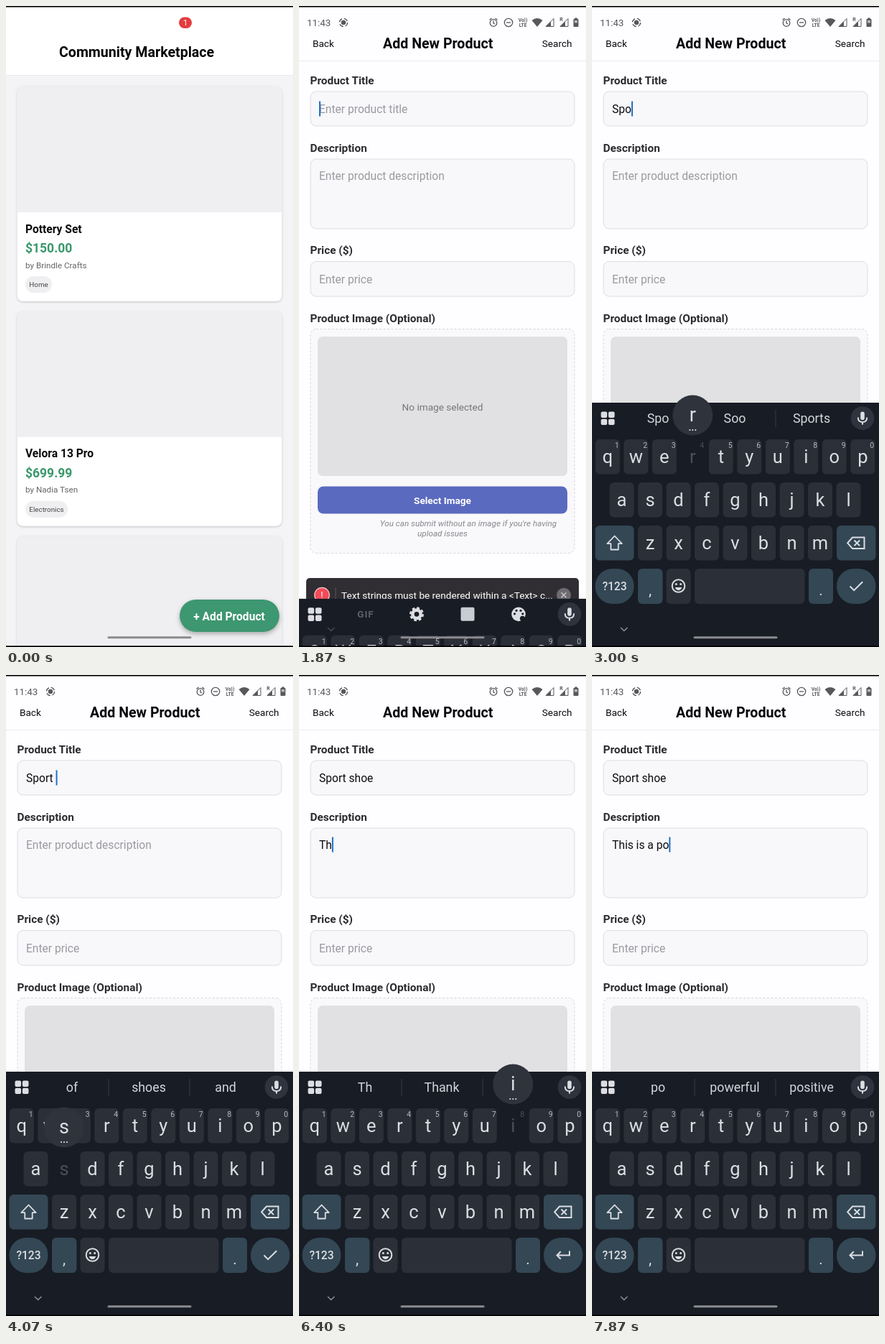
An HTML page that plays this animation: 400 by 892 pixels, repeating every 8000 ms.

```html
<!DOCTYPE html>
<html lang="en">
<head>
<meta charset="utf-8">
<title>Marketplace form</title>
<style>
  html, body { margin: 0; width: 100%; height: 100%; overflow: hidden; background: #fff; }
  svg { display: block; width: 400px; height: 892px; }
  text { font-family: Roboto, sans-serif; white-space: pre; }
  .card { filter: drop-shadow(0 1.5px 1.5px rgba(0, 0, 0, .2)); }
  .fab { filter: drop-shadow(0 3px 3px rgba(0, 0, 0, .28)); }
  .line { fill: none; stroke: #dcdee3; stroke-width: 2; }
</style>
</head>
<body>
<svg id="stage" viewBox="0 0 400 892" xmlns="http://www.w3.org/2000/svg"></svg>
<script>
const LOOP = 8000, COMMIT = 85, FOCUS = [1630, 5170];
const KEY = '#2b2f38', ALT = '#334754', BOARD = '#181c25', INK = '#dcdee3';

// Key presses: time, character, field
const presses = [
  [2560, 'S', 0], [2730, 'p', 0], [2865, 'o', 0], [2985, 'r', 0], [3200, 't', 0], [3500, ' ', 0],
  [4055, 's', 0], [4200, 'h', 0], [4340, 'o', 0], [4490, 'e', 0],
  [6060, 'T', 1], [6220, 'h', 1], [6390, 'i', 1], [6540, 's', 1], [6680, ' ', 1],
  [6860, 'i', 1], [6960, 's', 1], [7060, ' ', 1], [7260, 'a', 1], [7360, ' ', 1],
  [7660, 'p', 1], [7760, 'o', 1]
];

const hints = {
  'S': 'S|So|She', 'Sp': 'Sp|So|Special', 'Spo': 'Spo|Soo|Sports', 'Spor': 'Spor|Sport|Sports',
  'Sport': 'Sport|Sports|Sporting', 'Sport ': 'of|shoes|and', 'Sport s': 's|shoes|shirt',
  'Sport sh': 'sh|shoes|she', 'Sport sho': 'sho|shoes|show', 'Sport shoe': 'shoe|shoes|show',
  'T': 'T|The|This', 'Th': 'Th|Thank|The', 'Thi': 'Thi|This|Think', 'This': 'This|Thus|Things',
  'This ': 'is|was|will', 'This i': 'i|is|in', 'This is': 'is|its|isn\'t', 'This is ': 'a|the|my',
  'This is a': 'a|an|and', 'This is a ': 'great|good|very', 'This is a p': 'p|place|perfect',
  'This is a po': 'po|powerful|positive'
};

// Markup helpers; text is placed by the middle of its capitals
const text = (x, y, s, size, fill, o = '') =>
  `<text x="${x}" y="${(y + size * .355).toFixed(2)}" font-size="${size}" fill="${fill}" ${o}>${s}</text>`;
const rect = (x, y, w, h, r, fill, o = '') =>
  `<rect x="${x}" y="${y}" width="${w}" height="${h}" rx="${r}" fill="${fill}" ${o}/>`;
const circle = (x, y, r, fill, o = '') => `<circle cx="${x}" cy="${y}" r="${r}" fill="${fill}" ${o}/>`;
const path = (d, o = '') => `<path d="${d}" ${o}/>`;
const group = (id, body, o = '') => `<g id="${id}" ${o}>${body}</g>`;
const BOLD = 'font-weight="700"', MID = 'text-anchor="middle"';

const card = (y, title, price, seller, tag, tagWidth) => `
  ${rect(15.5, y, 369, 299, 8, '#fff', 'class="card"')}
  ${path(`M15.5 ${y + 175}v-167q0-8 8-8h353q8 0 8 8v167z`, 'fill="#efeef1"')}
  ${text(27, y + 198, title, 15.6, '#0c0c0e', BOLD)}
  ${text(27, y + 225, price, 17.5, '#3a986c', BOLD)}
  ${text(27, y + 248.5, seller, 11.7, '#66666a')}
  ${rect(27, y + 264, tagWidth, 23, 11.5, '#efeef1')}
  ${text(27 + tagWidth / 2, y + 275.8, tag, 9.8, '#47474b', MID)}`;

const market = `
  ${rect(0, 0, 400, 892, 0, '#f4f3f6')}
  ${rect(0, 0, 400, 96, 0, '#fff')}${rect(0, 96, 400, 1, 0, '#e9e8eb')}
  ${rect(241, 15.5, 18, 15.5, 7.7, '#e53c3f')}${text(250, 23.2, '1', 11.7, '#fff', MID)}
  ${text(74, 64, 'Community Marketplace', 19.6, '#050507', BOLD)}
  ${card(112, 'Pottery Set', '$150.00', 'by Brindle Crafts', 'Home', 37)}
  ${card(424.7, 'Velora 13 Pro', '$699.99', 'by Nadia Tsen', 'Electronics', 59)}
  ${card(738, '', '', '', '', 0)}
  ${group('fab', rect(242, 826, 139, 45, 22.5, '#3d9770', 'class="fab"') +
    text(311, 849, '+ Add Product', 15.6, '#fff', BOLD + MID))}`;

const field = (y, h, label) => text(15.5, y - 15.3, label, 15.4, '#2b2b2f', BOLD) +
  rect(16, y + .5, 368, h, 8, '#f8f7fa', 'stroke="#dddce0"');

const form = `
  ${rect(0, 0, 400, 892, 0, '#fefdff')}${rect(0, 76, 400, 1, 0, '#ebeaed')}
  ${text(19, 52, 'Back', 13.6, '#0c0c0e')}
  ${text(117, 52, 'Add New Product', 19.6, '#050507', BOLD)}
  ${text(380.5, 52, 'Search', 13.6, '#0c0c0e', 'text-anchor="end"')}
  <g id="body">
    ${field(118.5, 48, 'Product Title')}${field(212.5, 97, 'Description')}${field(355, 48.5, 'Price ($)')}
    ${text(28, 143, '', 15.6, '#000', 'id="field0"')}
    ${text(28, 236.7, '', 15.6, '#000', 'id="field1"')}
    ${text(28, 380, 'Enter price', 15.6, '#9b9a9f')}
    ${rect(28, 132.5, 2, 21, 0, '#1f70c6', 'id="caret"')}
    ${text(15.5, 434.5, 'Product Image (Optional)', 15.4, '#2b2b2f', BOLD)}
    ${rect(16, 449.5, 368, 312, 8, '#f9f8fb', 'stroke="#d6d5d9" stroke-dasharray="3 2.5"')}
    ${rect(26, 460, 348, 194, 7, '#e1e0e3')}
    ${text(200, 558, 'No image selected', 13.6, '#757479', MID)}
    ${rect(26, 668.5, 348, 38, 8, '#5a6abf')}
    ${text(200, 688, 'Select Image', 13.6, '#fff', BOLD + MID)}
    ${text(236, 720, 'You can submit without an image if you\'re having', 11.7, '#88878c', MID + ' font-style="italic"')}
    ${text(200, 734, 'upload issues', 11.7, '#88878c', MID + ' font-style="italic"')}
    ${rect(16, 803, 368, 48, 8, '#3d9770')}${text(200, 824, 'Add Product', 15.6, '#fff', BOLD + MID)}
  </g>`;

const toast = `
  ${rect(10, 796, 380, 47, 5, '#302e33')}
  ${circle(32, 819.7, 10.3, '#f34b58', 'stroke="#f5c9cd" stroke-width="1.2"')}
  ${text(32, 819.7, '!', 13, '#fff', MID)}
  ${rect(50.5, 809, 1, 22, 0, '#59575d')}
  ${text(59, 820, 'Text strings must be rendered within a &lt;Text&gt; c...', 13.6, '#fff')}
  ${circle(369, 819.7, 10, '#6e6c72')}
  ${path('M365.5 816.2l7 7m0-7l-7 7', 'stroke="#c9c8cc" stroke-width="1.4"')}`;

const bars = x => path(`M${x} 28.5h11v-11z`, 'fill="none" stroke="#58575b"') + path(`M${x} 28.5h7v-7z`, 'fill="#58575b"');
const status = `
  ${text(11, 23.2, '11:43', 13.4, '#58575b')}
  <g fill="none" stroke="#58575b" stroke-width="1.3">
    ${circle(62, 23, 2.6, '#58575b')}${circle(62, 23, 5.6, 'none', 'stroke-dasharray="6 2.8"')}
    ${circle(271, 23.5, 4.8, 'none')}${path('M271 20.5v3.3l2 1.2M265.5 19.5l3-2.6M276.5 19.5l-3-2.6')}
    ${circle(292, 23, 5.7, 'none')}${path('M289 23h6')}
  </g>
  ${text(312, 20, 'Vo))', 6.6, '#58575b', BOLD + MID)}${text(312, 27, 'LTE', 6.6, '#58575b', BOLD + MID)}
  ${path('M324.5 20q7.5-6 15 0l-7.5 9z', 'fill="#58575b"')}
  ${bars(344)}${bars(364)}${text(365.5, 18.5, 'R', 7, '#58575b', BOLD + MID)}
  ${rect(382.5, 18, 7, 11, 1, '#58575b')}${rect(384.3, 16.5, 3.4, 2, 0, '#58575b')}${rect(384, 20, 4, 3.5, 0, '#b9b8bc')}`;

// Letter keys, laid out row by row
const keys = {};
[['qwertyuiop', 21.8, 603], ['asdfghjkl', 41.5, 663], ['zxcvbnm', 81, 723]].forEach(([row, x0, y]) =>
  [...row].forEach((c, i) => keys[c] = { x: x0 + i * 39.5, y }));
const letterKeys = Object.entries(keys).map(([c, { x, y }], i) => `<g>
  ${rect(x - 17, y, 34, 48.5, 6, KEY, `id="cap-${c}"`)}
  ${text(x, y + 23.5, c, 25.5, INK, `id="key-${c}" ${MID}`)}
  ${i < 10 ? text(x + 13, y + 8.5, (i + 1) % 10, 10.5, '#b8bbc2', `id="num-${c}" ${MID}`) : ''}</g>`).join('');

const arrow = 'M31.5 737.5l10.2 10.7h-5v8.3h-10.4v-8.3h-5z';
const toolbar = `
  ${text(93, 573.5, 'GIF', 13.5, '#5b616c', BOLD + MID + ' letter-spacing="1"')}
  ${circle(164, 573.5, 5.7, 'none', `stroke="${INK}" stroke-width="4.6"`)}
  ${circle(164, 573.5, 8.7, 'none', `stroke="${INK}" stroke-width="2.6" stroke-dasharray="3.8 3.03"`)}
  ${rect(225.5, 564, 19, 19, 2, '#c9ccd2')}
  ${circle(306, 573.5, 9.8, INK)}${circle(311.5, 579.5, 3.6, BOARD)}
  ${[[300.5, 573], [303, 568.5], [309, 568.5], [311.8, 573]].map(([x, y]) => circle(x, y, 1.6, BOARD)).join('')}`;

const board = `
  ${rect(0, 552, 400, 350, 0, BOARD)}
  ${[0, 1, 2, 3].map(i => rect(12.5 + i % 2 * 10.4, 564.5 + (i >> 1) * 10.2, 8.6, 8.4, 2, INK)).join('')}
  ${group('tools', toolbar)}
  ${group('hints', rect(142.5, 562, 1, 24, 0, '#353a44') + rect(255.5, 562, 1, 24, 0, '#353a44') +
    [92, 199, 306].map((x, i) => text(x, 574, '', 17.8, '#d3d6dc', `id="hint${i}" ${MID}`)).join(''))}
  ${circle(377, 573.5, 16.3, '#2f333d')}${rect(374.2, 564.5, 5.6, 11.5, 2.8, INK)}
  ${path('M370.8 572.5q0 6.5 6.2 6.5t6.2-6.5M377 579v3.6', 'class="line" stroke-width="1.8"')}
  ${letterKeys}
  ${rect(4.5, 723, 54, 48.5, 6, ALT)}
  ${path(arrow, `id="shift" stroke="${INK}" stroke-width="1.8" stroke-linejoin="round"`)}
  ${rect(341, 723, 54.5, 48.5, 6, ALT)}
  ${path('M363 739.5h16.5v15.5h-16.5l-6.8-7.7zM365.5 743.5l7.6 7.6m0-7.6l-7.6 7.6', 'class="line"')}
  ${rect(4.5, 783, 54, 49, 24, ALT)}${text(31.5, 807.5, '?123', 15.6, INK, 'font-weight="500"' + MID)}
  ${rect(64, 783, 34.5, 49, 6, ALT)}${text(81, 813, ',', 21, INK, MID)}
  ${rect(103.5, 783, 34, 49, 6, KEY)}${circle(120.5, 807, 8.8, 'none', 'class="line"')}
  ${circle(117.3, 804.5, 1.5, INK)}${circle(123.7, 804.5, 1.5, INK)}
  ${path('M115.7 809h9.6q-1.5 4-4.8 4t-4.8-4z', `fill="${INK}"`)}
  ${rect(143, 783, 153.5, 49, 6, KEY, 'id="space"')}
  ${rect(302, 783, 34, 49, 6, ALT)}${text(319, 813, '.', 21, INK, MID)}
  ${rect(341, 783, 54.5, 49, 24, ALT)}${path('', 'id="enter" class="line"')}
  ${group('popup', circle(0, 0, 28, '#2f333c') + `<text id="popChar" y="8.5" font-size="27" fill="${INK}" ${MID}></text>` +
    [-4, 0, 4].map(x => circle(x, 20.5, 1.1, INK)).join(''))}`;

document.getElementById('stage').innerHTML = `
  ${group('market', market)}
  ${group('form', form)}
  ${group('status', status)}
  ${group('toast', toast)}
  ${group('under', rect(0, 552, 400, 340, 0, '#fefdff'))}
  ${rect(396, 77, 4, 286, 0, '#b3b2b6', 'id="scroll"')}
  ${group('board', board)}
  ${path('M40 865l4.7 4.5 4.7-4.5', 'id="chevron" fill="none" stroke="#8d929b" stroke-width="1.5"')}
  ${rect(141.5, 877.3, 117, 3, 1.5, '#8b8a8f', 'id="pill"')}
  ${rect(0, 0, 400, 1.6, 0, '#000')}${rect(0, 890.3, 400, 2, 0, '#000')}`;

const $ = id => document.getElementById(id);
const set = (id, name, value) => $(id).setAttribute(name, value);
const show = (id, on) => set(id, 'visibility', on ? 'visible' : 'hidden');
const ramp = (t, from, to) => Math.min(1, Math.max(0, (t - from) / (to - from)));
const placeholders = ['Enter product title', 'Enter product description'];

function drawScreens(t) {
  const press = Math.min(ramp(t, 50, 130), 1 - ramp(t, 190, 330));
  set('fab', 'opacity', 1 - press * .5);
  const scale = 1 - .1 * (1 - ramp(t, 260, 760)) ** 4;
  set('form', 'transform', `translate(200 446) scale(${scale}) translate(-200 -446)`);
  const fade = ramp(t, 260, 460);
  set('form', 'opacity', fade);
  set('status', 'opacity', fade);
  show('market', fade < 1);
  set('toast', 'opacity', ramp(t, 620, 720));
  set('body', 'transform', `translate(0 ${t < 965 ? .5 : 0})`);
}

function drawFields(t) {
  const focus = t < FOCUS[0] ? -1 : t < FOCUS[1] ? 0 : 1;
  const done = presses.filter(p => p[0] + COMMIT <= t);
  const values = [0, 1].map(f => done.filter(p => p[2] === f).map(p => p[1]).join(''));
  values.forEach((v, f) => {
    $('field' + f).textContent = v || placeholders[f];
    set('field' + f, 'fill', v ? '#0c0c0e' : '#9b9a9f');
  });
  if (focus < 0) {
    show('caret', false);
    return { focus, value: '' };
  }
  const value = values[focus];
  const since = Math.max(FOCUS[focus], ...done.map(p => p[0] + COMMIT));
  show('caret', (t - since) % 1000 < 500);
  set('caret', 'x', 28 + (value ? $('field' + focus).getComputedTextLength() : 0));
  set('caret', 'y', focus ? 225.5 : 132.5);
  return { focus, value };
}

function drawBoard(t, focus, value) {
  const up = t >= 1850;
  show('board', up);
  show('under', t >= 2000);
  show('chevron', up);
  set('chevron', 'opacity', .4 + .6 * ramp(t, 2070, 2270));
  set('board', 'transform', `translate(0 ${340 * (1 - ramp(t, 1850, 2147)) ** 3})`);
  set('pill', 'fill', t > 1930 && t < 2230 ? '#07080b' : '#8b8a8f');
  set('scroll', 'opacity', t < 1960 ? 0 : 1 - ramp(t, 2330, 2600));

  const caps = !value;
  const down = presses.find(p => t >= p[0] && t < p[0] + 105);
  const held = down ? down[1].toLowerCase() : '';
  for (const c in keys) {
    const off = c === held;
    $('key-' + c).textContent = caps ? c.toUpperCase() : c;
    set('key-' + c, 'fill', off ? '#4b4f58' : INK);
    set('cap-' + c, 'fill', off ? BOARD : KEY);
    if ($('num-' + c)) set('num-' + c, 'fill', off ? '#4b4f58' : '#b8bbc2');
  }
  set('space', 'fill', held === ' ' ? '#3c414b' : KEY);
  set('shift', 'fill', caps ? INK : 'none');
  set('enter', 'd', focus === 1 ? 'M377 801.5v6h-17.5m5.3-5.3l-5.3 5.3 5.3 5.3' : 'M359.5 807.5l5.7 5.7 12-12');

  const words = up && hints[value];
  $('tools').style.display = words ? 'none' : '';
  $('hints').style.display = words ? '' : 'none';
  if (words) words.split('|').forEach((w, i) => $('hint' + i).textContent = w);

  const key = keys[held];
  $('popup').style.display = key ? '' : 'none';
  if (key) {
    set('popup', 'transform', `translate(${key.x} ${key.y - 33.5})`);
    set('popup', 'opacity', 1 - ramp(t, down[0] + 88, down[0] + 105));
    $('popChar').textContent = down[1];
  }
}

const start = performance.now();
function frame() {
  const t = (performance.now() - start) % LOOP;
  drawScreens(t);
  const { focus, value } = drawFields(t);
  drawBoard(t, focus, value);
  requestAnimationFrame(frame);
}
frame();
</script>
</body>
</html>
```
